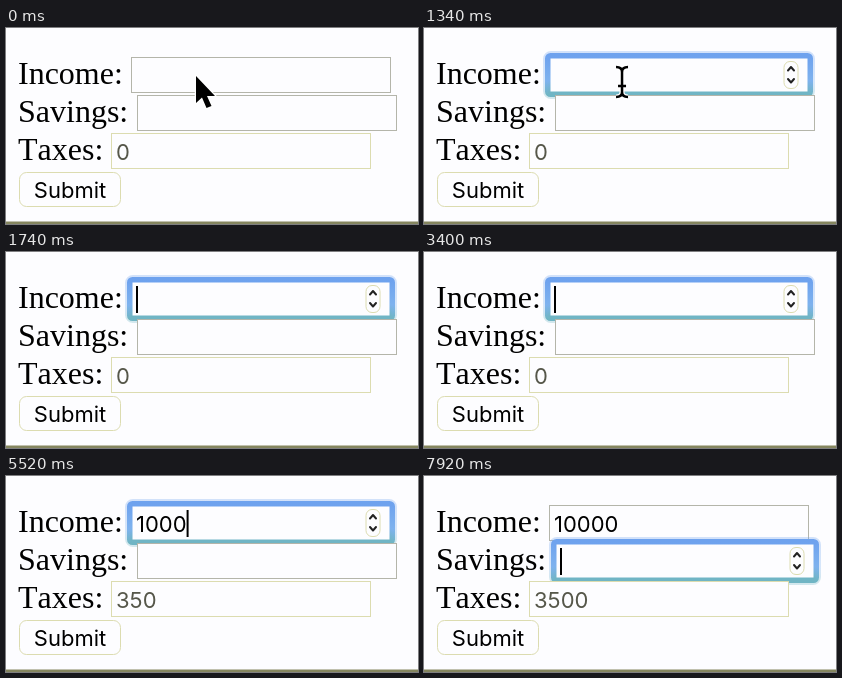
Write an HTML page that moves like this. It is 412 px wide and 196 px high and loops after 8000 ms.

```html
<!DOCTYPE html>
<html lang="en">
<head>
<meta charset="utf-8">
<style>
html, body { margin: 0; width: 100%; height: 100%; overflow: hidden; background: #fdfdff; }
svg { display: block; width: 412px; height: 196px; }
.label { font: 32px "Liberation Serif", "Times New Roman", serif; font-kerning: none; }
.ui { font: 22px Inter, "Liberation Sans", sans-serif; }
.box { fill: #fdfdff; stroke: #b4b5aa; }
.soft { stroke: #dcdcb0; }
.line { fill: none; stroke: #222; stroke-width: 2; stroke-linecap: round; stroke-linejoin: round; }
</style>
</head>
<body>
<svg viewBox="0 0 412 196">
  <defs>
    <linearGradient id="glow" x2="0" y2="1">
      <stop offset="0" stop-color="#6ea2ee"/>
      <stop offset=".65" stop-color="#7eb2ee"/>
      <stop offset="1" stop-color="#70b5c4"/>
    </linearGradient>
    <path id="beam" d="M-6-15Q0-15 0-10V10Q0 15-6 15M6-15Q0-15 0-10M0 10Q0 15 6 15M-4 4H4"/>
  </defs>
  <g id="fields"></g>
  <rect class="box soft" x="13.5" y="144.5" width="101" height="34" rx="7"/>
  <text class="ui" x="64" y="170" text-anchor="middle">Submit</text>
  <rect y="193.5" width="412" height="2.5" fill="#85865f"/>
  <path id="arrow" d="M0 0V27L6 21.500 10.500 32 15.500 30 11 20H19Z" stroke="#fff" stroke-width="2.500" paint-order="stroke"/>
  <g id="ibeam" fill="none">
    <use href="#beam" stroke="#fff" stroke-width="5"/>
    <use href="#beam" stroke="#000" stroke-width="2.500"/>
  </g>
</svg>
<script>
const LOOP = 8000;
const $ = id => document.getElementById(id);

// Each row: start time, then its values, held until the next row.
const INCOME = [[0, ""], [3420, "1"], [4700, "10"], [5100, "100"], [5400, "1000"], [6640, "10000"]];
const TAXES = [[0, "0"], [3420, "0,35"], [4700, "3,5"], [5100, "35"], [5400, "350"], [6640, "3500"]];
const FOCUS = [[0, ""], [500, "income"], [7900, "savings"]];
const CARET = [[0, true], [1020, false], [1520, true], [2000, false], [3400, true]];
const POINTER = [[0, 190, 48], [500, 191, 52], [1300, 191, 52], [1580, 239, 66], [1640, 300, 96], [1720, 380, 138]];

const at = (rows, t) => rows.filter(row => row[0] <= t).pop()[1];

function pointerAt(t) {
  const next = POINTER.findIndex(p => p[0] > t);
  if (next < 0) return null;
  const [t0, x0, y0] = POINTER[next - 1], [t1, x1, y1] = POINTER[next];
  const k = (t - t0) / (t1 - t0);
  return [x0 + (x1 - x0) * k, y0 + (y1 - y0) * k];
}

function addField(name, label, x, y, soft) {
  $("fields").insertAdjacentHTML("beforeend", `
    <text class="label" x="12" y="${y + 27}">${label}</text>
    <g transform="translate(${x} ${y})">
      <g id="${name}Ring" fill="none" stroke="url(#glow)">
        <rect x="-2" y="-2" width="264" height="40" rx="4" stroke-width="8" opacity=".3"/>
        <rect x="-1.500" y="-1.500" width="263" height="39" rx="3" stroke-width="5"/>
      </g>
      <rect class="box ${soft ? "soft" : ""}" x=".5" y=".5" width="259" height="35"/>
      <rect id="${name}Inset" x=".5" y=".5" width="259" height="35" fill="none" stroke="url(#glow)" stroke-width="2"/>
      <text id="${name}Text" class="ui" x="5" y="27" fill="${soft ? "#56574a" : "#000"}"></text>
      <g id="${name}Spin">
        <rect class="box soft" x="235" y="4.500" width="14" height="27" rx="6"/>
        <path class="line" d="M239 13.500l3-3.500 3 3.500M239 22l3 3.500 3-3.500"/>
      </g>
      <rect id="${name}Caret" y="5" width="2" height="27"/>
    </g>`);
}

const show = (id, on) => $(id).style.display = on ? "" : "none";

function place(id, point) {
  show(id, point);
  if (point) $(id).setAttribute("transform", `translate(${point})`);
}

function draw(t) {
  $("incomeText").textContent = at(INCOME, t);
  $("taxesText").textContent = at(TAXES, t);
  const focus = at(FOCUS, t);
  for (const name of ["income", "savings", "taxes"]) {
    const on = name === focus;
    for (const part of ["Ring", "Inset", "Spin"]) show(name + part, on);
    show(name + "Caret", on && at(CARET, t));
    if (on) $(name + "Caret").setAttribute("x", 5 + $(name + "Text").getComputedTextLength());
  }
  const point = t < 500 ? [190, 48] : pointerAt(t);
  const inField = t >= 500 && point && point[1] < 104;
  place("ibeam", inField ? point : null);
  place("arrow", inField ? null : point);
}

addField("income", "Income:", 125, 29);
addField("savings", "Savings:", 131, 67);
addField("taxes", "Taxes:", 105, 105, true);

const start = performance.now();
function tick() {
  draw((performance.now() - start) % LOOP);
  requestAnimationFrame(tick);
}
tick();
</script>
</body>
</html>
```
